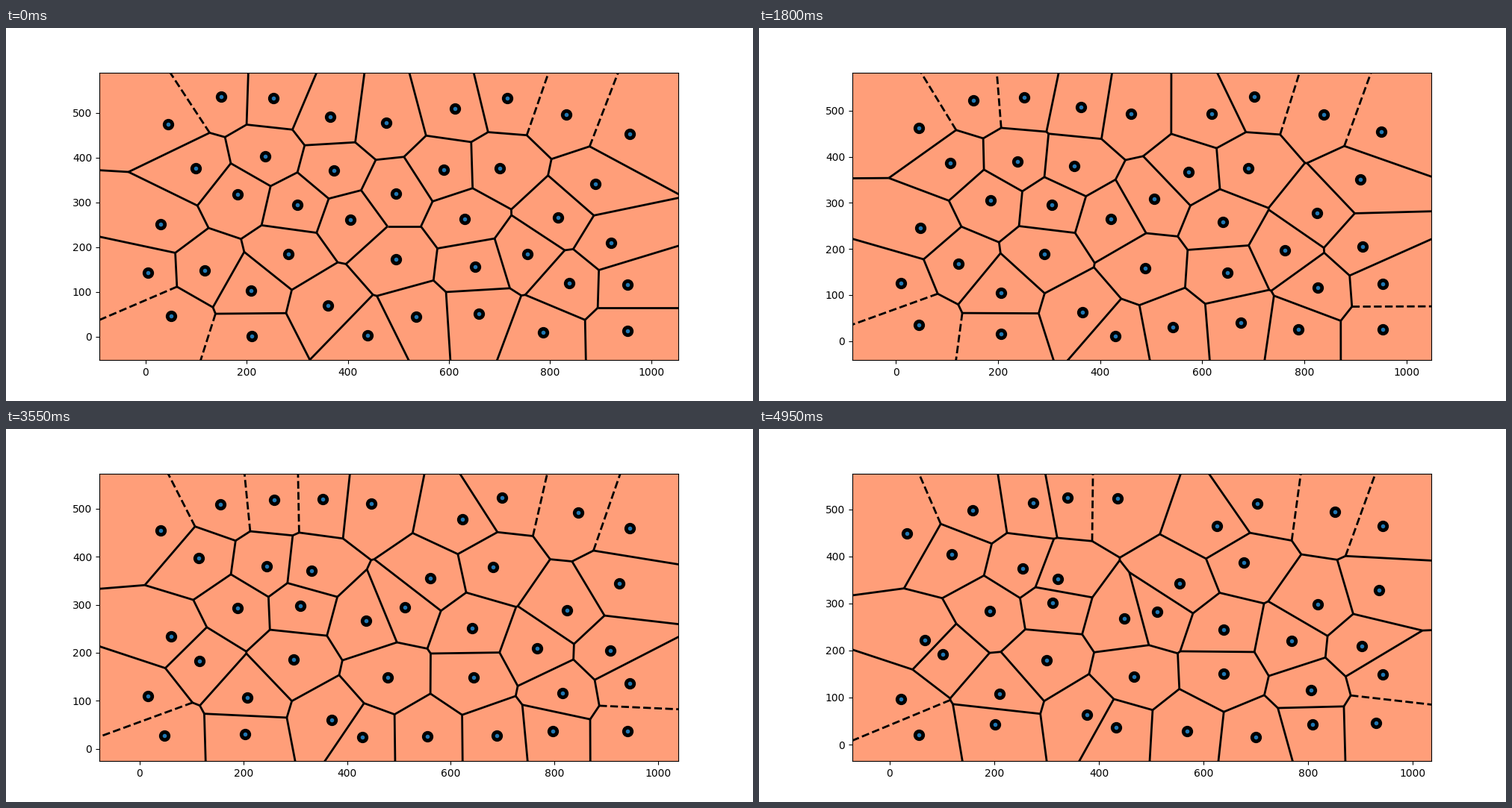
A matplotlib script that plays this animation: 1000x500 px, repeating every 5000 ms.

```python
import matplotlib.pyplot as plt
import numpy as np
from matplotlib.animation import FuncAnimation
from matplotlib.collections import LineCollection
from matplotlib.tri import Triangulation

FRAMES = 100
ARENA = np.array([960, 540])

# Where each site starts: x, y.
STARTS = np.array([
    (45, 475), (150, 536), (253, 533), (365, 491), (476, 478), (612, 510),
    (715, 532), (832, 496), (958, 453), (99, 376), (237, 403), (373, 371),
    (590, 373), (701, 376), (890, 341), (182, 318), (300, 294), (495, 319),
    (405, 261), (631, 263), (816, 266), (30, 251), (283, 184), (495, 173),
    (652, 156), (755, 184), (921, 209), (4, 143), (117, 148), (209, 102),
    (361, 69), (838, 119), (953, 116), (51, 46), (210, 1), (439, -2),
    (535, 44), (659, 51), (786, 9), (953, 12)])

# How far it drifts in one loop, and how much the path bows out: dx, dy, bow.
DRIFTS = np.array([
    (-12, -26, -6), (9, -38, 1), (21, 33, -12), (-25, 34, 9), (-40, 46, -1),
    (14, -45, -1), (-12, -19, 11), (19, -1, 4), (-15, 12, -3), (20, 29, 0),
    (18, -28, 7), (-51, -19, 18), (-36, -30, 6), (-24, 11, -6), (45, -12, -16),
    (10, -34, 0), (12, 8, 2), (16, -36, -6), (44, 7, -1), (8, -19, -7),
    (2, 32, 8), (37, -29, -7), (17, -5, -7), (-28, -29, -6), (-14, -5, -6),
    (13, 37, 3), (-18, 0, -5), (17, -46, 1), (-15, 44, 12), (1, 6, -3),
    (16, -5, 6), (-32, -3, -2), (24, 33, 6), (5, -25, 8), (-8, 42, -1),
    (-6, 38, -7), (33, -15, 10), (41, -35, -2), (22, 34, -7), (37, 34, -1)])


def sites_at(frame):
    """Drift along shallow arcs, bouncing off the arena walls."""
    u = frame / (FRAMES - 1)
    travel, bow = DRIFTS[:, :2], DRIFTS[:, 2:]
    sideways = travel[:, ::-1] * [1, -1]
    sideways = sideways / np.linalg.norm(travel, axis=1, keepdims=True)
    path = STARTS + u * travel + 4 * u * (1 - u) * bow * sideways
    return ARENA - np.abs(ARENA - np.abs(path))


def circumcenters(a, b, c):
    b, c = b - a, c - a
    det = 2 * (b[:, 0] * c[:, 1] - b[:, 1] * c[:, 0])
    bb, cc = (b ** 2).sum(axis=1), (c ** 2).sum(axis=1)
    x = (c[:, 1] * bb - b[:, 1] * cc) / det
    y = (b[:, 0] * cc - c[:, 0] * bb) / det
    return a + np.column_stack([x, y])


def voronoi_edges(points):
    """Return the bounded edges and the open rays of the Voronoi diagram."""
    mesh = Triangulation(*points.T)
    vertices = circumcenters(*(points[mesh.triangles[:, k]] for k in range(3)))
    center = points.mean(axis=0)
    reach = 3 * np.ptp(points, axis=0).max()
    edges, rays = [], []
    for i, neighbors in enumerate(mesh.neighbors):
        for k, j in enumerate(neighbors):
            if j > i:
                edges.append([vertices[i], vertices[j]])
            elif j < 0:
                p = points[mesh.triangles[i, k]]
                q = points[mesh.triangles[i, (k + 1) % 3]]
                tx, ty = (q - p) / np.hypot(*(q - p))
                normal = np.array([-ty, tx])
                outward = normal * np.sign(np.dot((p + q) / 2 - center, normal))
                rays.append([vertices[i], vertices[i] + outward * reach])
    return edges, rays


fig, ax = plt.subplots(figsize=(10, 5), dpi=100)
ax.set_facecolor("#ff9e79")
bounded, unbounded = (
    ax.add_collection(
        LineCollection([], colors="black", linewidths=2, linestyles=style),
        autolim=False)
    for style in ("solid", "dashed"))
discs, = ax.plot([], [], "ko", markersize=10)
cores, = ax.plot([], [], ".", color="C0", markersize=6)


def draw(frame):
    points = sites_at(frame)
    edges, rays = voronoi_edges(points)
    bounded.set_segments(edges)
    unbounded.set_segments(rays)
    for markers in (discs, cores):
        markers.set_data(*points.T)
    low, high = points.min(axis=0), points.max(axis=0)
    margin = 0.1 * (high - low)
    ax.set_xlim(low[0] - margin[0], high[0] + margin[0])
    ax.set_ylim(low[1] - margin[1], high[1] + margin[1])
    return bounded, unbounded, discs, cores


animation = FuncAnimation(fig, draw, frames=FRAMES, interval=50, repeat=True)
plt.show()
```
